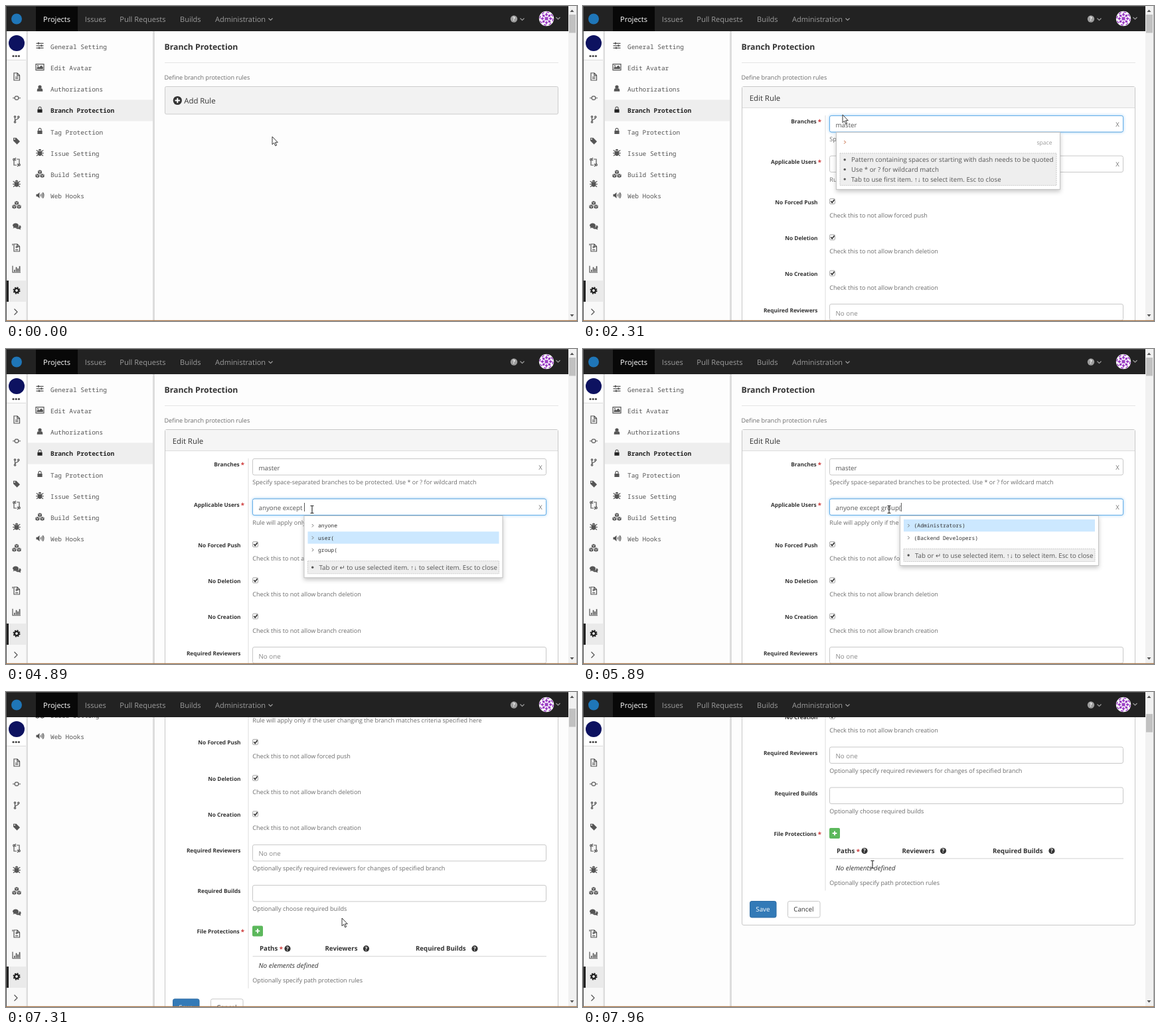
Animation, 860 px wide and 475 px high, one loop 8 s. Source, as an HTML page:

```html
<!DOCTYPE html>
<html lang="en">
<head>
<meta charset="utf-8">
<title>Branch Protection</title>
<style>
html, body { margin: 0; width: 100%; height: 100%; overflow: hidden; background: #fdfdfd; }
svg { display: block; }
text { font: 9.75px "Open Sans", "Noto Sans", sans-serif; fill: #555; text-rendering: geometricPrecision; white-space: pre; }
.nav { font-size: 11.05px; fill: #9d9d9d; }
.on { fill: #fff; }
.title { font-size: 12.28px; font-weight: 700; fill: #333; }
.head { font-size: 11.4px; fill: #333; }
.help { font-size: 9.06px; fill: #6c6c6c; }
.label { font-size: 8.3px; font-weight: 700; fill: #333; text-anchor: end; }
.th { font-size: 9.67px; font-weight: 700; fill: #333; }
.star { font-size: 9.6px; font-weight: 700; fill: #c33; }
.hold { fill: #888; }
.it { font-size: 10px; font-style: italic; fill: #333; }
.btn { fill: #333; }
.mono { font: 9.43px "Noto Sans Mono", "DejaVu Sans Mono", monospace; }
.sel { font-weight: 700; fill: #222; }
.item { font: 8.05px "Noto Sans Mono", "DejaVu Sans Mono", monospace; fill: #333; }
.desc { font-size: 8.6px; fill: #999; text-anchor: end; }
.x { font-size: 9.5px; fill: #777; text-anchor: middle; }
.box { fill: #fff; stroke: #c8c8c8; }
.focus { fill: #fff; stroke: #66afe9; filter: drop-shadow(0 0 2px rgba(82, 168, 236, .6)); }
.pop { fill: #fff; stroke: #c4c4c4; filter: drop-shadow(0 3px 3px rgba(0, 0, 0, .22)); }
.hint { fill: #eee; stroke: #ccc; stroke-dasharray: 2 1; }
.ico { fill: none; stroke: #555; stroke-width: 1.2; }
.ico .f, .f { fill: #555; stroke: none; }
.dark .f { fill: #222; }
</style>
</head>
<body>
<svg id="stage" width="860" height="475" viewBox="0 0 860 475"></svg>
<script>
const LOOP = 8000;

const text = (x, y, s, c = "", id = "") => `<text x="${x}" y="${y}" class="${c}"${id && ` id="${id}"`}>${s}</text>`;
const rect = (x, y, w, h, a = "") => `<rect x="${x}" y="${y}" width="${w}" height="${h}" ${a}/>`;
const fill = c => `fill="${c}"`;
const box = (x, y, w, h, c = "box", id = "") => rect(x, y, w, h, `rx="2.5" class="${c}"${id && ` id="${id}"`}`);
const chevron = (x, y, c) => `<path d="M${x - 3} ${y - 1.5}l3 3 3-3" fill="none" stroke="${c}" stroke-width="1.2"/>`;
const path = (d, c = "") => `<path d="${d}" class="${c}"/>`;
const solid = d => path(d, "f");
const cube = (x, y) => solid(`M${x} ${y - 3}l3 1.2v3.6l-3 1.3-3-1.3v-3.6z`) +
  `<path d="M${x - 2.4} ${y - 1.4}l2.4 1 2.4-1M${x} ${y - .4}v2.8" stroke="#fff" stroke-width=".6"/>`;
const sheet = path("M-4-5.5h5l3.5 3.5v7.5h-8.5zM.8-5.5v3.8h3.7");

const ICONS = {
  file: sheet + path("M-2 .5h4.5M-2 2.7h4.5"),
  commit: path("M-6 0h3.2M2.8 0h3.2") + rect(-2.6, -2.6, 5.2, 5.2, 'rx="1.5"'),
  branch: path("M-2.5-3v6M2.8-2.5c0 3-5 2-5 4.5") + '<circle cx="-2.5" cy="-4" r="1.2"/><circle cx="2.8" cy="-3.6" r="1.2"/><circle cx="-2.5" cy="4" r="1.2"/>',
  tag: solid("M-5-4.5h4.5l5.5 5.5-4.4 4.4-5.6-5.5z") + '<circle cx="-3" cy="-2.6" r="1" fill="#f7f7f7" stroke="none"/>',
  pull: path("M-4-2.5v7h4M4 2.5v-7h-4M-1-6.5l-2 2 2 2M1 2.5l2 2-2 2") + '<circle cx="-4" cy="-4" r="1.3"/><circle cx="4" cy="4" r="1.3"/>',
  bug: solid("M-2.2-3a2.2 2.2 0 0 1 4.4 0zM-3.2-2.4h6.4v3.6a3.2 3.8 0 0 1-6.4 0z") + path("M-5.3-3.6l2.6 1.8M5.3-3.6l-2.6 1.8M-5.8 .8h11.6M-5 5l2.4-2M5 5l-2.4-2"),
  cubes: cube(0, -3) + cube(-3.6, 2.6) + cube(3.6, 2.6),
  comments: solid("M-6-1c0-5 9-5 9 0s-4.5 3.5-6 3l-2.5 1.2 1-2zM4-1.8c4 1 2.5 4.5 1.5 5l.8 2-2.8-1.2c-3 .3-4-.5-4.5-1.2 3 0 5.3-1.6 5-4.6z"),
  diff: sheet + path("M-6-3.5v-2.5M-1.8-1h4M.2-3v4M-1.8 3.2h4"),
  chart: path("M-6-5v10h12") + solid("M-4 1h1.7v3h-1.7zM-1.3-3h1.7v7h-1.7zM1.2-1h1.7v5h-1.7zM3.7-4.5h1.7v8.5h-1.7z"),
  cog: '<circle r="3.1" stroke="#222" stroke-width="2.4"/><circle r="4.7" stroke="#222" stroke-width="1.6" stroke-dasharray="2 1.69"/>',
  next: path("M-2.5-4.5l4.5 4.5-4.5 4.5"),
  sliders: path("M-5.5-3.5h11M-5.5 0h11M-5.5 3.5h11") + solid("M-3-5h1.8v3h-1.8zM1.5-1.5h1.8v3h-1.8zM-2 2h1.8v3h-1.8z"),
  image: path("M-6-4.5h12v9h-12z") + solid("M-4.5 3v-2l2-2 1.5 1.5 3-3 2.8 2.8v2.7z") + '<circle class="f" cx="-3" cy="-2" r="1"/>',
  user: solid("M-4.3 4.5c0-4 1-4.5 2.3-4.5h4c1.3 0 2.3 .5 2.3 4.5z") + '<circle class="f" cy="-2.3" r="2.6"/>',
  lock: solid("M-3.6-.8h7.2v5h-7.2z") + path("M-2-.8v-1.7a2 2 0 0 1 4 0v1.7"),
  volume: solid("M-5.5-1.7h2l3-2.8v9l-3-2.8h-2z") + path("M1.2-1.6q1.4 1.6 0 3.2M2.8-3q2.6 3 0 6M4.3-4.3q3.5 4.3 0 8.6")
};
const icon = (n, x, y, c = "") => `<g class="ico ${c}" transform="translate(${x} ${y})">${ICONS[n]}</g>`;
const badge = (x, y, s, c, r = 4.6) =>
  `<circle cx="${x}" cy="${y}" r="${r}" fill="${c}"/><text x="${x}" y="${y + 2.9}" style="font-size:8px;font-weight:700;fill:#fff" text-anchor="middle">${s}</text>`;
const plus = (x, y, r, w) => `<path d="M${x - r} ${y}h${2 * r}M${x} ${y - r}v${2 * r}" stroke="#fff" stroke-width="${w}"/>`;

function menu() {
  const rows = [["sliders", "General Setting"], ["image", "Edit Avatar"], ["user", "Authorizations"], ["lock", "Branch Protection"],
    ["lock", "Tag Protection"], ["bug", "Issue Setting"], ["cubes", "Build Setting"], ["volume", "Web Hooks"]];
  return rect(33, 141.5, 188, 32, fill("#eee")) + rows.map(([n, s], i) => {
    const y = 60.3 + i * 32.25, on = i == 3;
    return icon(n, 51, y - .5, on ? "dark" : "") + text(67, y + 4.2, s, on ? "mono sel" : "mono");
  }).join("");
}

const label = (y, s, star) => text(star ? 351.7 : 353.5, y, s, "label") + (star ? text(353.8, y + 1, "*", "star") : "");
const check = (y, name, what) => label(y, name) + rect(371.5, y - 8, 8, 8, 'rx="1.5" fill="#f4f4f4" stroke="#aaa"') +
  `<path d="M373.3 ${y - 4.2}l1.9 2.2 3.4-4.6" fill="none" stroke="#333" stroke-width="1.6"/>` +
  text(371.3, y + 20.5, "Check this to not allow " + what, "help");

function form() {
  const field = (y, id) => box(371.5, y, 442, 24.5) + (id ? box(371.5, y, 442, 24.5, "focus", id + "Focus") +
    text(380.5, y + 17, "", "", id) + text(805, y + 16, "X", "x", id + "X") : "");
  return box(239.5, 121.5, 592, 596.5) + rect(240, 122, 591, 31, fill("#f5f5f5")) + rect(240, 153, 591, 1, fill("#ddd")) +
    text(250.7, 142.8, "Edit Rule", "head") + rect(364.5, 165, 1, 501, fill("#ddd")) +
    label(177, "Branches", 1) + field(165.5, "branch") +
    text(371.3, 204, "Specify space-separated branches to be protected. Use * or ? for wildcard match", "help") +
    label(238, "Applicable Users", 1) + field(226, "users") +
    text(371.3, 265, "Rule will apply only if the user changing the branch matches criteria specified here", "help") +
    check(298.5, "No Forced Push", "forced push") + check(352.8, "No Deletion", "branch deletion") +
    check(407, "No Creation", "branch creation") +
    label(461.5, "Required Reviewers") + field(449.5) + text(380.5, 466.5, "No one", "hold") +
    text(371.3, 488.5, "Optionally specify required reviewers for changes of specified branch", "help") +
    label(522, "Required Builds") + field(510.5) + text(371.3, 549.2, "Optionally choose required builds", "help") +
    label(583, "File Protections", 1) + rect(371, 571.5, 16, 16, 'rx="2" fill="#5cb85c"') + plus(379, 579.5, 3.3, 1.8) +
    text(382, 609.5, "Paths", "th") + text(411.7, 610, "*", "star") + badge(424, 606, "?", "#333") +
    text(480.5, 609.5, "Reviewers", "th") + badge(542.5, 606, "?", "#333") +
    text(617, 609.5, "Required Builds", "th") + badge(706, 606, "?", "#333") + rect(371.5, 617, 442.5, 1.3, fill("#ddd")) +
    text(380.5, 635, "No elements defined", "it") + text(371.3, 657, "Optionally specify path protection rules", "help") +
    rect(251.5, 682, 39.5, 24.5, 'rx="2.5" fill="#337ab7" stroke="#2e6da4"') + text(260.3, 697.8, "Save", "on") +
    box(308.5, 682, 48.5, 24.5) + text(317.3, 697.8, "Cancel", "btn");
}

function shell() {
  const nav = [[56, "Projects"], [118.8, "Issues"], [171.3, "Pull Requests"], [262, "Builds"], [315, "Administration"]];
  const side = ["file", "commit", "branch", "tag", "pull", "bug", "cubes", "comments", "diff", "chart", "cog", "next"];
  const spokes = Array.from({ length: 8 }, (_, i) =>
    `<path d="M0-9l2.2 3-2.2 2.5-2.2-2.5z" transform="rotate(${i * 45})" fill="#9b3fc4"/>`).join("");
  return rect(221, 38, 3, 437, fill("#ddd")) +
    rect(0, 38, 31, 437, fill("#f8f8f8")) + rect(0, 38, 31, 44, fill("#fff")) + rect(1, 81, 29, 1, fill("#ddd")) +
    rect(30.5, 38, 2.5, 437, fill("#ddd")) + '<circle cx="16" cy="56" r="12" fill="#0d1260"/>' +
    [11, 15.2, 19.4].map(x => `<circle cx="${x}" cy="75.5" r="1.6" fill="#444"/>`).join("") +
    rect(1, 414, 29.5, 32, fill("#eaeaea")) + rect(1, 414, 3, 32, fill("#222")) +
    side.map((n, i) => icon(n, n == "next" ? 15 : 16, 106.5 + i * 32.25)).join("") +
    rect(0, 0, 847, 38, fill("#222")) + rect(45, 1, 63, 37, fill("#080808")) +
    '<circle cx="16" cy="19.5" r="8" fill="#1f76b8"/>' +
    nav.map(([x, s], i) => text(x, 23.5, s, i ? "nav" : "nav on")).join("") +
    chevron(398.5, 20, "#9d9d9d") + badge(765, 19.5, "?", "#9d9d9d", 5.2) + chevron(777.5, 20, "#9d9d9d") +
    `<circle cx="814" cy="19" r="11.2" fill="#fff"/><g transform="translate(814 19)">${spokes}` +
    '<circle r="9.8" fill="none" stroke="#9b3fc4" stroke-width="1.6" stroke-dasharray="4 3.7"/><path d="M-2.5-2.5h5v5h-5z" fill="#9b3fc4"/></g>' +
    chevron(831.5, 18.5, "#9d9d9d") +
    rect(847, 0, 13, 475, fill("#f1f1f1")) + '<path d="M849.5 9l3-3.5 3 3.5z" fill="#555"/><path d="M849.5 465l3 3.5 3-3.5z" fill="#555"/>' +
    rect(848, 13, 10, 27.5, 'id="thumb" fill="#c1c1c1"') + rect(859, 0, 1, 475, fill("#aaa")) +
    rect(0, 0, 1, 475, fill("#555")) + rect(0, 0, 847, 1, fill("#444")) + rect(0, 473.8, 860, 1.2, fill("#a8784c"));
}

document.getElementById("stage").innerHTML =
  rect(0, 0, 860, 475, fill("#fdfdfd")) +
  `<g id="page">${menu()}${text(238.5, 66, "Branch Protection", "title")}${rect(239, 85, 593, 1, fill("#e5e5e5"))}
  ${text(238.5, 110.8, "Define branch protection rules", "help")}
  <g id="add">${rect(239.5, 121.5, 592, 41.5, 'id="addBox" rx="2"')}<circle cx="258.3" cy="142.5" r="6.6" fill="#333"/>
  ${plus(258.3, 142.5, 3.8, 2)}${text(268.2, 147, "Add Rule", "head")}</g>
  <g id="form">${form()}<path id="squiggle" d="M417 245.5h10" stroke="#d66" stroke-dasharray="1.5 1"/>
  ${rect(0, 0, .9, 13, 'id="caret" fill="#444"')}</g></g>` +
  shell() + '<g id="popup"></g>' +
  `<g id="mouse"><path id="arrow" d="M0 0v11.8l2.7-2.5 2 4.5 1.9-.8-2-4.3h3.7z" fill="#fff" stroke="#222" stroke-width=".9"/>
  <path id="beam" d="M-2.5-5.5h2l.5.5.5-.5h2M-2.5 5.5h2l.5-.5.5.5h2M0-5v10" fill="none" stroke="#222" stroke-width="1.1"/></g>`;

const $ = id => document.getElementById(id);
const show = (id, v) => { $(id).style.display = v ? "" : "none"; };

// Steps: [time, value...]
const BRANCH = [[0, ""], [1240, "m"], [1340, "ma"], [1440, "mas"], [2060, "master"]];
const USERS = [[0, "anyone"], [3750, "anyone "], [3890, "anyone e"], [3960, "anyone ex"], [4130, "anyone except"],
  [4170, "anyone except "], [5340, "anyone except group"], [5440, "anyone except group("], [6100, "anyone except group(Administrators)"]];
const CARET_OFF = [[1030, 1240], [1960, 2060], [2310, 2840], [4410, 4750], [5680, 5820], [6340, 6870], [7400, 8000]];

const FIRST = ["Tab to use first item. ↑↓ to select item. Esc to close"];
const PICKED = ["Tab or ↵ to use selected item. ↑↓ to select item. Esc to close"];
const PATTERN = ["Pattern containing spaces or starting with dash needs to be quoted", "Use * or ? for wildcard match", ...FIRST];
const CRITERIA = ["anyone", "user(", "group("], GROUPS = ["(Administrators)", "(Backend Developers)"];
const branchPop = items => [381.5, 190.5, 337, items, -1, PATTERN];
const userPop = (x, items, sel = -1) => [x, 251.5, sel < 0 ? 258 : 299, items, sel, sel < 0 ? FIRST : PICKED];
const POPUPS = [
  [0], [560, ...branchPop(["master", "master-fix", "dev", "release", "test", "docs"])],
  [1240, ...branchPop(["master", "master-fix"])], [2060, ...branchPop(["~space"])], [2700],
  [3300, ...userPop(381.5, ["anyone", "~space"])], [3750, ...userPop(417.5, ["except"])],
  [4170, ...userPop(449, CRITERIA)], [4750, ...userPop(449, CRITERIA, 0)], [4890, ...userPop(449, CRITERIA, 1)],
  [5100, ...userPop(449, CRITERIA, 2)], [5340], [5440, ...userPop(477.5, GROUPS)],
  [5820, ...userPop(477.5, GROUPS, 0)], [6100]
];
const MOUSE = [[30, 401, 197], [270, 391, 156], [410, 391, 156], [560, 391, 164], [2510, 391, 164], [3250, 461, 242],
  [6510, 461, 242], [6900, 506, 341], [7580, 506, 341], [7940, 436, 260]];
const SCROLL = [[6936, 0], [7000, 37.5], [7250, 205], [7310, 219], [7345, 222], [7420, 290], [7560, 366.5]];

const at = (list, t) => list.filter(s => s[0] <= t).pop();
const ramp = (t, a, b) => Math.min(1, Math.max(0, (t - a) / (b - a)));
const smooth = k => k * k * (3 - 2 * k);

function tween(list, t, ease = k => k) {
  const i = list.findIndex(s => s[0] > t);
  if (i == 0) return list[0].slice(1);
  if (i < 0) return list[list.length - 1].slice(1);
  const a = list[i - 1], b = list[i], k = ease(ramp(t, a[0], b[0]));
  return a.slice(1).map((v, j) => v + (b[j + 1] - v) * k);
}

function popup([, x, y, w, items, sel, hints]) {
  if (!items) return "";
  const top = y + 31.5 + (items.length - 1) * 18.3, high = 4.5 + hints.length * 14.7;
  return rect(x, y, w, top + high + 6 - y, 'class="pop"') +
    items.map((s, i) => {
      const m = y + 14.8 + i * 18.3, blank = s[0] == "~";
      return (i == sel ? rect(x + 5.5, m - 9.3, w - 11, 18.3, fill("#cce8ff")) : "") +
        `<path d="M${x + 11.8} ${m - 2.3}l2.3 2.3-2.3 2.3" fill="none" stroke="${blank ? "#c0592b" : "#777"}"/>` +
        (blank ? text(x + w - 12, m + 3.5, s.slice(1), "desc") : text(x + 21, m + 2.9, s, "item"));
    }).join("") +
    rect(x + 5.5, top, w - 11, high, 'class="hint"') +
    hints.map((s, i) => `<circle cx="${x + 12.7}" cy="${top + 9.7 + i * 14.7}" r="1.7" fill="#555"/>` +
      text(x + 22.5, top + 13.2 + i * 14.7, s)).join("");
}

let shown;
function render(t) {
  const [scroll] = tween(SCROLL, t), [mx, my] = tween(MOUSE, t, smooth);
  $("page").setAttribute("transform", `translate(0 ${-scroll})`);
  $("thumb").setAttribute("y", 13 + scroll * .055);

  const open = t >= 430, hover = my < 163 && t < 430;
  show("add", !open);
  show("form", open);
  $("addBox").setAttribute("fill", hover ? "#e8e8e8" : "#f2f2f2");
  $("addBox").setAttribute("stroke", hover ? "#adadad" : "#ccc");

  const branch = at(BRANCH, t)[1], users = at(USERS, t)[1], inUsers = t >= 3310;
  $("branch").textContent = branch;
  $("users").textContent = users;
  show("branchX", branch);
  $("branchFocus").style.opacity = ramp(t, 480, 630) - ramp(t, 3310, 3400);
  $("usersFocus").style.opacity = ramp(t, 3310, 3400);
  show("squiggle", t >= 3960 && t < 4130);

  const field = $(inUsers ? "users" : "branch");
  const len = field.textContent && open ? field.getComputedTextLength() : 0;
  $("caret").setAttribute("x", 380.6 + len);
  $("caret").setAttribute("y", inUsers ? 232 : 171.5);
  show("caret", t >= 500 && !CARET_OFF.some(([a, b]) => t >= a && t < b));

  const pop = at(POPUPS, t);
  if (pop !== shown) $("popup").innerHTML = popup(shown = pop);

  const beam = (t < 7000 && my > 226 && my < 251) || t >= 7900;
  show("beam", beam);
  show("arrow", !beam);
  $("mouse").setAttribute("transform", `translate(${mx} ${my})`);
}

const start = performance.now();
function frame() {
  render((performance.now() - start) % LOOP);
  requestAnimationFrame(frame);
}
frame();
</script>
</body>
</html>
```
